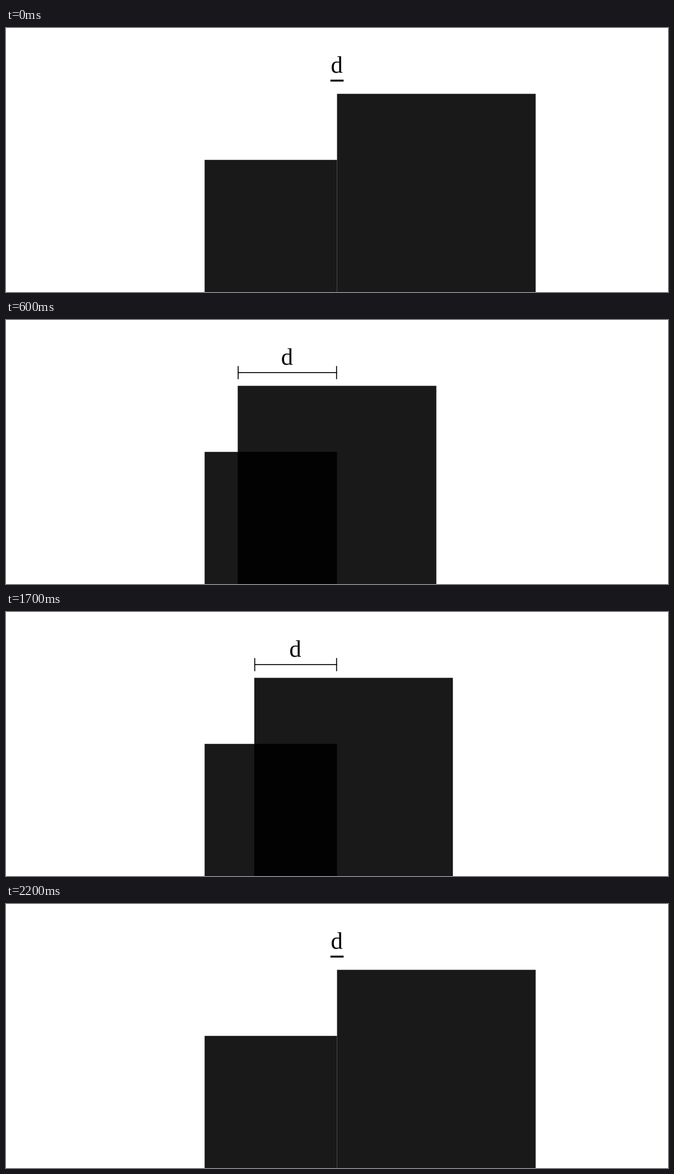
These frames come from a looping animation (1181 by 472 pixels, 2.3 s). An HTML page:

```html
<!DOCTYPE html>
<html lang="en">
<head>
<meta charset="utf-8">
<title>Overlap distance</title>
<style>
  /* Overlap between the two squares */
  @property --d {
    syntax: "<length>";
    inherits: true;
    initial-value: 0px;
  }

  html, body {
    margin: 0;
    width: 100%;
    height: 100%;
    overflow: hidden;
    background: #fff;
  }

  svg {
    display: block;
    width: 100%;
    height: 100%;
    --edge: 590.55px;
    --left: calc(var(--edge) - var(--d));
    animation: slide 2300ms infinite;
  }

  .square { fill: #000; fill-opacity: 0.9; }
  .mover { x: var(--left); }

  .bracket { animation: bracket 2300ms step-end infinite; }
  .dash { animation: dash 2300ms step-end infinite; }
  .span { x: var(--left); width: var(--d); }
  .start { x: var(--left); }

  .label {
    font: 42.5px "Liberation Serif", "Times New Roman", serif;
    text-anchor: middle;
    text-rendering: geometricPrecision;
    transform: translateX(calc(var(--d) / -2));
  }

  /* In at 0-800 ms, hold, back out at 1400-2200 ms, one step per 100 ms */
  @keyframes slide {
    0% { --d: 0px; animation-timing-function: steps(8, end); }
    34.7826% { --d: 236.22px; animation-timing-function: step-end; }
    60.8695% { --d: 236.22px; animation-timing-function: steps(8, end); }
    95.6521%, 100% { --d: 0px; }
  }

  /* With no overlap the bracket collapses into a flat dash */
  @keyframes bracket {
    0% { visibility: hidden; }
    4.3478% { visibility: visible; }
    95.6521%, 100% { visibility: hidden; }
  }
  @keyframes dash {
    0% { visibility: visible; }
    4.3478% { visibility: hidden; }
    95.6521%, 100% { visibility: visible; }
  }
</style>
</head>
<body>
<svg viewBox="0 0 1181 472">
  <rect class="square" x="354.33" y="235.78" width="236.22" height="237"/>
  <rect class="square mover" y="117.67" width="354.33" height="355"/>

  <g class="bracket">
    <rect class="span" y="93.22" height="1.66"/>
    <rect class="start" y="82.3" width="1.66" height="23.5"/>
    <rect x="588.89" y="82.3" width="1.66" height="23.5"/>
  </g>
  <rect class="dash" x="578.8" y="92.39" width="23.5" height="3.32"/>

  <text class="label" x="590" y="79.6">d</text>
</svg>
</body>
</html>
```
